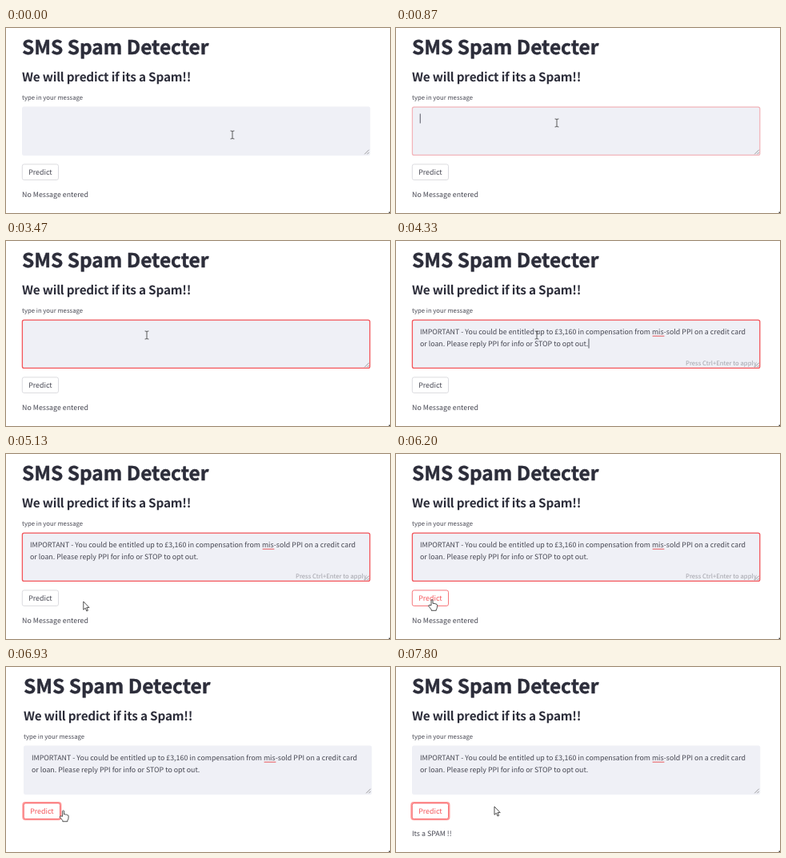
An HTML page that plays this animation: 480 by 232 pixels, repeating every 8000 ms.

```html
<!DOCTYPE html>
<html lang="en">
<head>
<meta charset="utf-8">
<title>SMS Spam Detecter</title>
<style>
  html, body { margin: 0; width: 100%; height: 100%; overflow: hidden; background: #fff; }
  svg { display: block; width: 480px; height: 232px; }
  text {
    font: 8.85px "Noto Sans CJK SC", "Noto Sans CJK JP", "Open Sans", sans-serif;
    fill: #464752; text-rendering: geometricPrecision; white-space: pre;
  }
  .title { font-size: 24.4px; font-weight: 700; fill: #2c2d3a; stroke: #2c2d3a; stroke-width: .45; }
  .sub { font-size: 15.3px; font-weight: 600; letter-spacing: -.2px; fill: #2c2d3a; }
  .small { font-size: 7.74px; }
  .hint { fill: #a0a1a8; }
  .line { fill: none; stroke-linecap: round; }
  .cursor { stroke: #222; stroke-width: .8; fill: #fff; stroke-linejoin: round; }
</style>
</head>
<body>
<svg viewBox="0 0 480 232">
  <g id="page">
    <text class="title" x="20" y="33">SMS Spam Detecter</text>
    <text class="sub" x="20" y="67">We will predict if its a Spam!!</text>
    <text class="small" x="20" y="90">type in your message</text>

    <rect x="20" y="98.5" width="435.3" height="61.5" rx="2.5" fill="#eff0f6"/>
    <rect id="border" x="20.4" y="99.1" width="434.4" height="60.3" rx="2.2" fill="none" stroke="#f4555a" stroke-width="1.3"/>
    <path class="line" d="M448.5 158l5-5M451.7 158l1.8-1.8" stroke="#777" stroke-width=".7"/>
    <g id="message">
      <text x="29.9" y="117.2">IMPORTANT - You could be entitled up to £3,160 in compensation from mis-sold PPI on a credit card</text>
      <text x="29.9" y="132">or loan. Please reply PPI for info or STOP to opt out.</text>
      <path class="line" d="M321 119.2h14" stroke="#e8575c"/>
    </g>
    <text id="hint" class="small hint" x="362" y="156">Press Ctrl+Enter to apply</text>
    <rect id="caret" width=".8" height="12" fill="#31333f"/>

    <rect id="ring" x="19.3" y="169.9" width="47.2" height="21.4" rx="3" fill="none" stroke="#ff9a9a" stroke-width="2"/>
    <rect id="button" x="20.3" y="170.9" width="45.2" height="19.6" rx="2.3" fill="#fff" stroke-width=".8"/>
    <text id="label" x="28.2" y="184.2">Predict</text>
    <text id="result" x="20" y="212.2"></text>
  </g>
  <rect x="478.6" y="230.6" width="1.4" height="1.4" fill="#333"/>

  <path id="beam" class="line" d="M-2-5Q-.3-5 0-4.2Q.3-5 2-5M0-4.2V4.2M-2 5Q-.3 5 0 4.2Q.3 5 2 5" stroke="#333" stroke-width=".8"/>
  <path id="arrow" class="cursor" d="M0 0V10.3L2.4 8.2L4 12L5.6 11.3L4 7.6H7.2Z"/>
  <path id="hand" class="cursor" d="M-1 7.4V.7q1-1.4 2 0V5q1-.8 2 .2q1.2-.5 1.9.5q1.5-.2 1.6 1.2V9q0 2-1.2 3.6v1.2H-.8v-1.2L-4.2 8.4q-.3-1.6 1.2-1.4z"/>
</svg>
<script>
const LOOP = 8000, FRAME = 200 / 3, RED = '#f4555a';
const FOCUS = 850, PASTE = 4320, CLICK = 6250, RERUN = 6650, DONE = 7320;
const el = id => document.getElementById(id);
const show = (id, on) => el(id).style.display = on ? '' : 'none';
const ramp = (t, from, to) => Math.max(0, Math.min(1, (t - from) / (to - from)));

const start = { x: 283, y: 134 };
const moves = [
  { from: 200, to: 467, x: 201, y: 119 },
  { from: 2400, to: 2667, x: 202, y: 126 },
  { from: 2933, to: 3333, x: 176, y: 118 },
  { from: 4600, to: 5130, x: 97, y: 185 },
  { from: 5130, to: 6000, x: 45, y: 182.5 },
  { from: 6640, to: 7500, x: 123, y: 175 }
];

function pointer(t) {
  let { x, y } = start;
  for (const m of moves) {
    const k = ramp(t, m.from, m.to);
    x += (m.x - x) * k;
    y += (m.y - y) * k;
  }
  return { x, y };
}

function draw(t) {
  const { x, y } = pointer(t);
  const inBox = y < 160, onButton = y > 170 && y < 191 && x < 73;
  const kind = inBox ? 'beam' : onButton ? 'hand' : 'arrow';
  for (const id of ['beam', 'arrow', 'hand']) show(id, id === kind);
  el(kind).setAttribute('transform', `translate(${x} ${y})`);

  // the scrollbar vanishes while the result is recomputed
  const running = t >= RERUN && t < DONE;
  el('page').setAttribute('transform', `translate(${running ? 2 : 0} 0)`);
  el('result').textContent = running ? '' : t < DONE ? 'No Message entered' : 'Its a SPAM !!';

  const pasted = t >= PASTE, clicked = t >= CLICK;
  el('border').style.opacity = ramp(t, FOCUS - 60, FOCUS + 140) - ramp(t, CLICK, CLICK + 200);
  show('message', pasted);
  show('hint', pasted && !clicked);
  show('ring', clicked);

  const blink = pasted ? (t - PASTE) % 1067 < 530 : (t - FOCUS) % 1067 < 475;
  show('caret', t >= FOCUS && !clicked && blink);
  el('caret').setAttribute('x', pasted ? 240.6 : 29.8);
  el('caret').setAttribute('y', pasted ? 122.5 : 107.5);

  const hot = onButton || clicked;
  el('button').setAttribute('stroke', hot ? RED : '#d3d3d9');
  el('label').style.fill = hot ? RED : '';
}

function tick() {
  const t = performance.now() % LOOP;
  draw(Math.floor((t + 5) / FRAME) * FRAME);
  requestAnimationFrame(tick);
}
tick();
</script>
</body>
</html>
```
